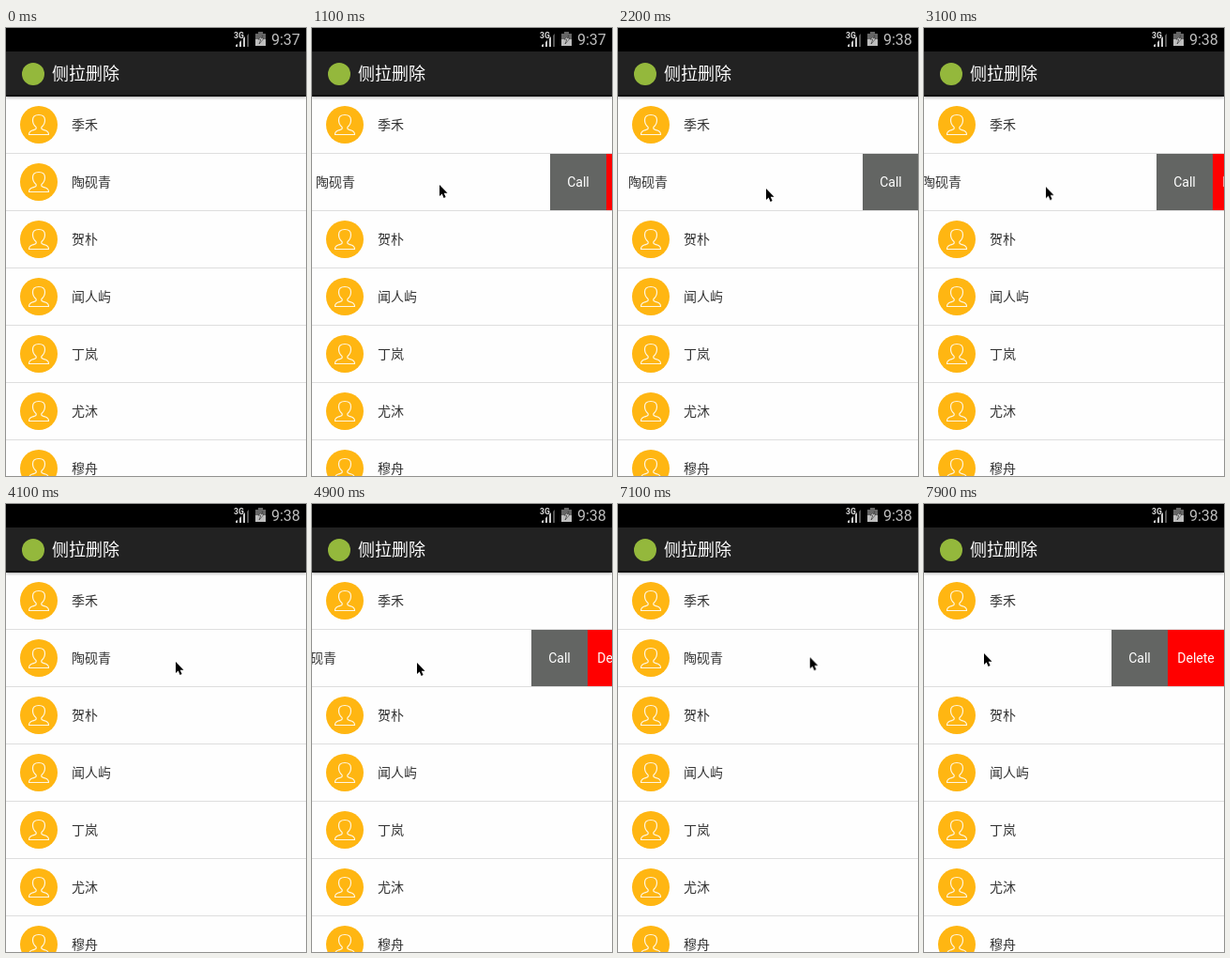
Recreate the animation shown at these times as an HTML page. Size 320x477 px, loop 8 s.

```html
<!DOCTYPE html>
<html lang="zh">
<head>
<meta charset="utf-8">
<title>侧拉删除</title>
<style>
html, body { margin: 0; width: 100%; height: 100%; overflow: hidden; background: #fefefe; }
#stage { position: relative; width: 320px; height: 477px; overflow: hidden; background: #fefefe;
  font: 14px/60px Roboto, "Noto Sans CJK SC", "Noto Sans CJK", sans-serif; color: #333; }
.status { position: absolute; inset: 0 0 auto; height: 25px; background: #000; color: #bebebe; }
.status svg { position: absolute; left: 240px; top: 0; }
.clock { position: absolute; left: 283px; top: 0; font-size: 16px; line-height: 25px; white-space: nowrap; }
.minute::after { content: "7"; animation: minute 8s -10ms infinite step-end; }
.bar { position: absolute; top: 25px; width: 320px; height: 48px; background: #222;
  border-bottom: 2px solid #111; box-sizing: border-box; box-shadow: 0 1px 3px #0005; z-index: 1; }
.logo { position: absolute; left: 17px; top: 12px; width: 24px; height: 24px; border-radius: 50%; background: #94b83c; }
.bar b { position: absolute; left: 49px; top: 0; font-weight: 500; font-size: 18px; line-height: 47px; color: #fff; }
.list { position: absolute; top: 73px; width: 320px; }
.row { height: 60px; overflow: hidden; border-bottom: 1px solid #dedede; }
.slide { position: relative; height: 60px; width: 440px; white-space: nowrap; }
.slide > * { position: absolute; top: 0; }
.slide > .avatar { left: 15px; top: 10px; width: 40px; height: 40px; }
.name { left: 70px; }
.call, .delete { width: 60px; height: 60px; text-align: center; color: #fff; }
.call { left: 320px; background: #636563; }
.delete { left: 380px; background: #f00; }
.active { animation: drag 8s -10ms infinite; }
.cursor { position: absolute; left: 0; top: 0; z-index: 2; overflow: visible; animation: point 8s -10ms infinite; }

/* steps(n) keeps each segment on a 100 ms beat */
@keyframes drag {
  0% { transform: none; animation-timing-function: steps(7); }
  8.75% { transform: none; animation-timing-function: steps(4); }
  13.75% { transform: translateX(-66px); animation-timing-function: steps(3); }
  17.5%, 21.25% { transform: translateX(-120px); animation-timing-function: steps(5); }
  27.5% { transform: translateX(-59px); animation-timing-function: steps(4); }
  32.5%, 35% { transform: none; animation-timing-function: steps(5); }
  41.25% { transform: translateX(-120px); animation-timing-function: steps(8); }
  51.25%, 55% { transform: none; animation-timing-function: steps(5); }
  61.25%, 62.5% { transform: translateX(-86px); animation-timing-function: steps(5); }
  68.75%, 76.25% { transform: translateX(-120px); animation-timing-function: steps(2); }
  78.75% { transform: translateX(-87px); animation-timing-function: steps(5); }
  85%, 90% { transform: none; animation-timing-function: steps(6); }
  97.5%, 100% { transform: translateX(-120px); }
}
@keyframes point {
  0% { transform: translate(-20px, -20px); animation-timing-function: step-end; }
  2.5% { transform: translate(286px, 79px); animation-timing-function: step-end; }
  3.75%, 5% { transform: translate(230px, 136px); animation-timing-function: steps(3); }
  8.75% { transform: translate(202px, 160px); animation-timing-function: steps(4); }
  13.75% { transform: translate(136px, 167px); animation-timing-function: steps(3); }
  17.5% { transform: translate(82px, 170px); animation-timing-function: steps(3); }
  21.25% { transform: translate(97px, 172px); animation-timing-function: steps(5); }
  27.5% { transform: translate(158px, 171px); animation-timing-function: steps(4); }
  32.5% { transform: translate(217px, 168px); animation-timing-function: steps(2); }
  35% { transform: translate(202px, 168px); animation-timing-function: steps(5); }
  41.25% { transform: translate(82px, 170px); animation-timing-function: steps(8); }
  51.25% { transform: translate(181px, 168px); animation-timing-function: steps(3); }
  55% { transform: translate(198px, 168px); animation-timing-function: steps(5); }
  61.25%, 62.5% { transform: translate(112px, 169px); animation-timing-function: steps(5); }
  68.75%, 70% { transform: translate(84px, 168px); animation-timing-function: steps(3); }
  73.75%, 76.25% { transform: translate(112px, 169px); animation-timing-function: steps(2); }
  78.75% { transform: translate(132px, 166px); animation-timing-function: steps(5); }
  85% { transform: translate(219px, 164px); animation-timing-function: steps(4); }
  90% { transform: translate(200px, 163px); animation-timing-function: steps(7); }
  98.75%, 100% { transform: translate(64px, 159px); }
}
@keyframes minute { 0% { content: "7"; } 22.5%, 100% { content: "8"; } }
</style>
</head>
<body>
<div id="stage">
  <div class="status">
    <svg width="40" height="25">
      <text x="3" y="11" font-family="Roboto, sans-serif" font-size="8.5" font-weight="700" fill="#ddd">3G</text>
      <path d="M5 20v-2l2-1v3zM9 20v-5l2-2v7zM13 20v-9l2-2v11z" fill="#ccc"/>
      <path d="M17 20V8l2-2v14z" fill="#555"/>
      <path d="M26 6h3V4h5v2h3v13H26z" fill="#666"/>
      <path d="M26 12h11v7H26z" fill="#bebebe"/>
      <path d="M34 8l-5 4h3l-2 5 5-6h-3z" fill="#eee" stroke="#333" stroke-width=".7"/>
    </svg>
    <span class="clock">9:3<span class="minute"></span></span>
  </div>
  <div class="bar"><i class="logo"></i><b>侧拉删除</b></div>
  <div class="list"></div>
  <svg class="cursor" width="9" height="15">
    <path d="M0 0V12L2.7 9.5 4.6 14 6.6 13.1 4.7 8.8H8.5Z"/>
  </svg>
</div>
<script>
const names = ["季禾", "陶砚青", "贺朴", "闻人屿", "丁岚", "尤沐", "穆舟"];
const activeRow = 1;
const avatar = `<svg class="avatar" viewBox="0 0 40 40">
  <circle cx="20" cy="20" r="20" fill="#ffb612"/>
  <path d="M17 22.5C14.5 20.5 13.5 18 13.5 15C13.5 11.5 16 9.5 20 9.5C24 9.5 26.5 11.5 26.5 15C26.5 18 25.5 20.5 23 22.5
    C22 25 24 25 27 26C30 27 30.5 28 30.5 30.5H9.5C9.5 28 10 27 13 26C16 25 18 25 17 22.5Z"
    fill="none" stroke="#fff6e0" stroke-width="1.2" stroke-linejoin="round"/>
</svg>`;
const buttons = '<span class="call">Call</span><span class="delete">Delete</span>';

document.querySelector(".list").innerHTML = names.map((name, i) => `
  <div class="row"><div class="slide ${i === activeRow ? "active" : ""}">
    ${avatar}<span class="name">${name}</span>${buttons}
  </div></div>`).join("");
</script>
</body>
</html>
```
